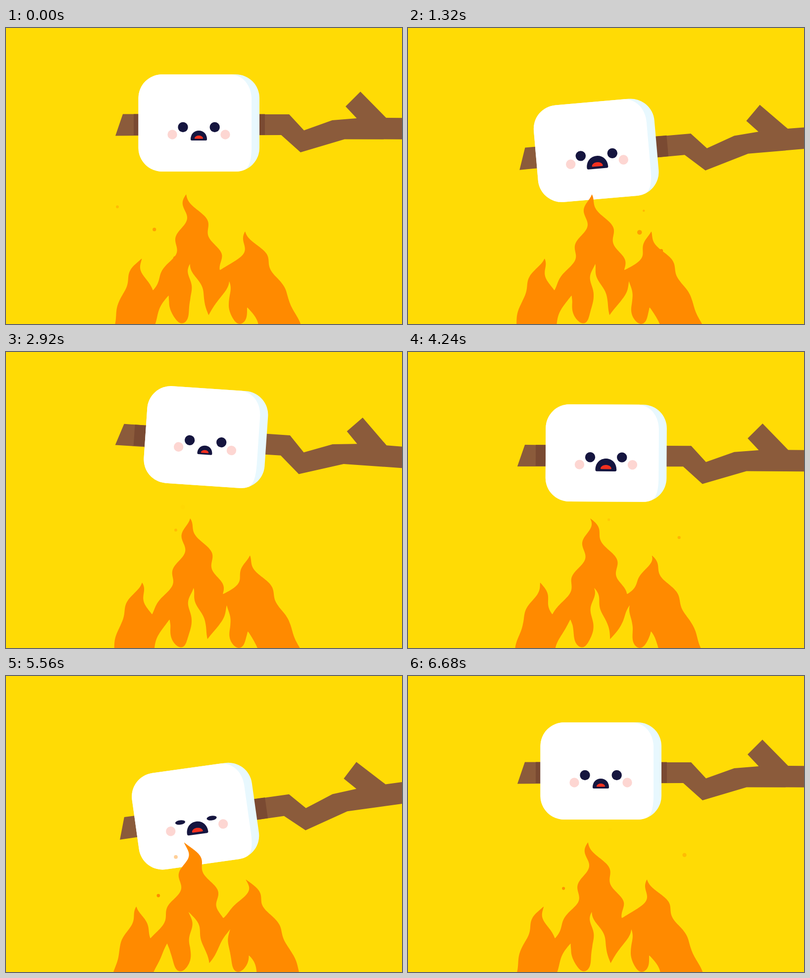
An HTML page for the animation above (6720 ms loop, 800 by 600 pixels).

```html
<!DOCTYPE html>
<html lang="en">
<head>
<meta charset="utf-8">
<title>Toasting marshmallow</title>
<style>
  html, body { margin: 0; width: 100%; height: 100%; overflow: hidden; background: #ffdb05; }
  svg { display: block; width: 100vw; height: 100vh; }
</style>
</head>
<body>
<svg viewBox="0 0 800 600">
  <rect width="800" height="600" fill="#ffdb05"/>
  <g id="stick">
    <path fill="#8b5b3b" d="M236 174.5 572 175 602 207.5 659 187 708.5 183 686 159 716 129 768 182 1000 184V226L684 225.5 595 252 556 217 221 218.5Z"/>
    <path fill="#7a4a32" d="M258 174.5H523V217H258Z"/>
    <g id="marshmallow">
      <rect x="267.5" y="94" width="244.5" height="197" rx="48" fill="#e8f8fe"/>
      <path fill="#fff" d="M315.5 94H456C482 97 496 120 496 144V241C496 266 492 282 483 287Q475 291 464 291H315.5A48 48 0 0 1 267.5 243V142A48 48 0 0 1 315.5 94Z"/>
      <g fill="#fdd6d2">
        <circle cx="336" cy="216" r="9.7"/>
        <circle cx="443" cy="216" r="9.7"/>
      </g>
      <g fill="#15153f">
        <ellipse class="eye" cx="357.5" cy="201" rx="10.2"/>
        <ellipse class="eye" cx="421.7" cy="201" rx="10.2"/>
      </g>
      <g id="mouth">
        <path fill="#15153f" d="M-21.5-3C-21.5-17-12-26 0-26S21.5-17 21.5-3Q21.5 0 18.5 0H-18.5Q-21.5 0-21.5-3Z"/>
        <path fill="#f4301f" d="M-9.5-4.5Q-11.5-4.5-11-6.500C-9.5-11-5-13 0-13S9.5-11 11-6.500Q11.5-4.5 9.5-4.5Z"/>
      </g>
    </g>
  </g>
  <path id="fire" fill="#ff8a00" d="M218 602Q231 530 270 467Q280 505 294 532Q359 445 365 337Q420 406 437 491Q486 460 487 412Q556 503 594 602H508Q504 582 489 566C486 612 452 612 452 560L450 513Q437 545 409 582Q397 525 373 478Q371 515 373 550C372 614 337 614 331 555L328 542Q308 570 299 602Z"/>
  <g id="sparks" fill="#ff8a00"></g>
</svg>
<script>
const LOOP = 6720, STEP = 40;
const $ = id => document.getElementById(id);
const clamp = v => Math.max(0, Math.min(1, v));
const ease = v => { v = clamp(v); return v * v * (3 - 2 * v); };

// Each beat eases into a new pose; grip delays the slide along the stick.
const MOVE = 960;
const REST = { angle: 0, drop: 0, slide: 0, open: .77 };
const BEATS = [
  { at: 200, angle: -4.95, drop: 19.3, slide: -11, open: 1, grip: 0 },
  { at: 1875, angle: 3.9, drop: 9.5, slide: 13, open: .7, grip: 0 },
  { at: 3890, angle: -8, drop: 32.9, slide: -11, open: 1, grip: 160 },
  { at: 5720, ...REST, grip: 0 }
];
const BLINKS = [2360, 5610];

const follow = (t, key, delay = () => 0, span = () => MOVE) => BEATS.reduce(
  (v, beat) => v + (beat[key] - v) * ease((t - beat.at - delay(beat)) / span(beat)),
  REST[key]);

// Sample the resting flame once, then bend the samples in every picture.
const fire = $("fire"), outline = [];
for (let s = 0, end = fire.getTotalLength(); s < end; s += 2)
  outline.push(fire.getPointAtLength(s));

// A sideways wave that climbs the flame and weakens near the ground.
function sway(y, t) {
  const size = 2 + 5 * clamp((550 - y) / 90);
  return -size * Math.cos(2 * Math.PI * ((y - 353) / 70 + t * .0006));
}

let seed = 7;
const random = (low, high) => {
  seed = (seed * 16807) % 2147483647;
  return low + (high - low) * seed / 2147483647;
};

// Sparks leave the fire at steady intervals, rise and fade out.
const SPARKS = 28, FLIGHT = 1250, GROUND = 560, RISE = .2;
const sparks = Array.from({ length: SPARKS }, (_, i) => {
  const dot = document.createElementNS("http://www.w3.org/2000/svg", "circle");
  dot.setAttribute("cx", random(225, 580));
  $("sparks").append(dot);
  return { dot, born: (i + random(0, 1)) * (LOOP + FLIGHT) / SPARKS - FLIGHT, size: random(2, 5) };
});

function drawMarshmallow(t) {
  const angle = follow(t, "angle"), drop = follow(t, "drop");
  $("stick").setAttribute("transform", `translate(0 ${drop}) rotate(${angle} 800 193.5)`);
  const slide = follow(t, "slide", beat => beat.grip);
  $("marshmallow").setAttribute("transform",
    `translate(${slide} ${-.19 * Math.max(0, slide)})`);

  // The mouth opens faster than it closes.
  const open = follow(t, "open", () => 0, beat => beat.open === 1 ? MOVE * .4 : MOVE);
  $("mouth").setAttribute("transform",
    `translate(389.5 ${228 + 6.5 * Math.max(0, open - REST.open)}) scale(${open})`);
  const shut = Math.max(...BLINKS.map(b => ease(1 - Math.abs(t - b) / 120)));
  document.querySelectorAll(".eye").forEach(eye =>
    eye.setAttribute("ry", 10.2 * (1 - .9 * shut)));
}

function drawFire(t) {
  fire.setAttribute("d", "M" + outline.map(({ x, y }) =>
    `${(x + sway(y, t)).toFixed(2)} ${y.toFixed(2)}`).join("L") + "Z");
  for (const { dot, born, size } of sparks) {
    const climb = (t - born) * RISE;
    dot.setAttribute("cy", GROUND - climb);
    dot.setAttribute("r", size * clamp(climb / 20));
    dot.setAttribute("opacity", clamp((FLIGHT * RISE - climb) / 140));
  }
}

function draw(t) {
  drawMarshmallow(t);
  drawFire(t);
}

const begin = performance.now();
function frame() {
  const t = (performance.now() - begin) % LOOP;
  draw(Math.floor(t / STEP) * STEP);
  requestAnimationFrame(frame);
}
draw(0);
requestAnimationFrame(frame);
</script>
</body>
</html>
```
